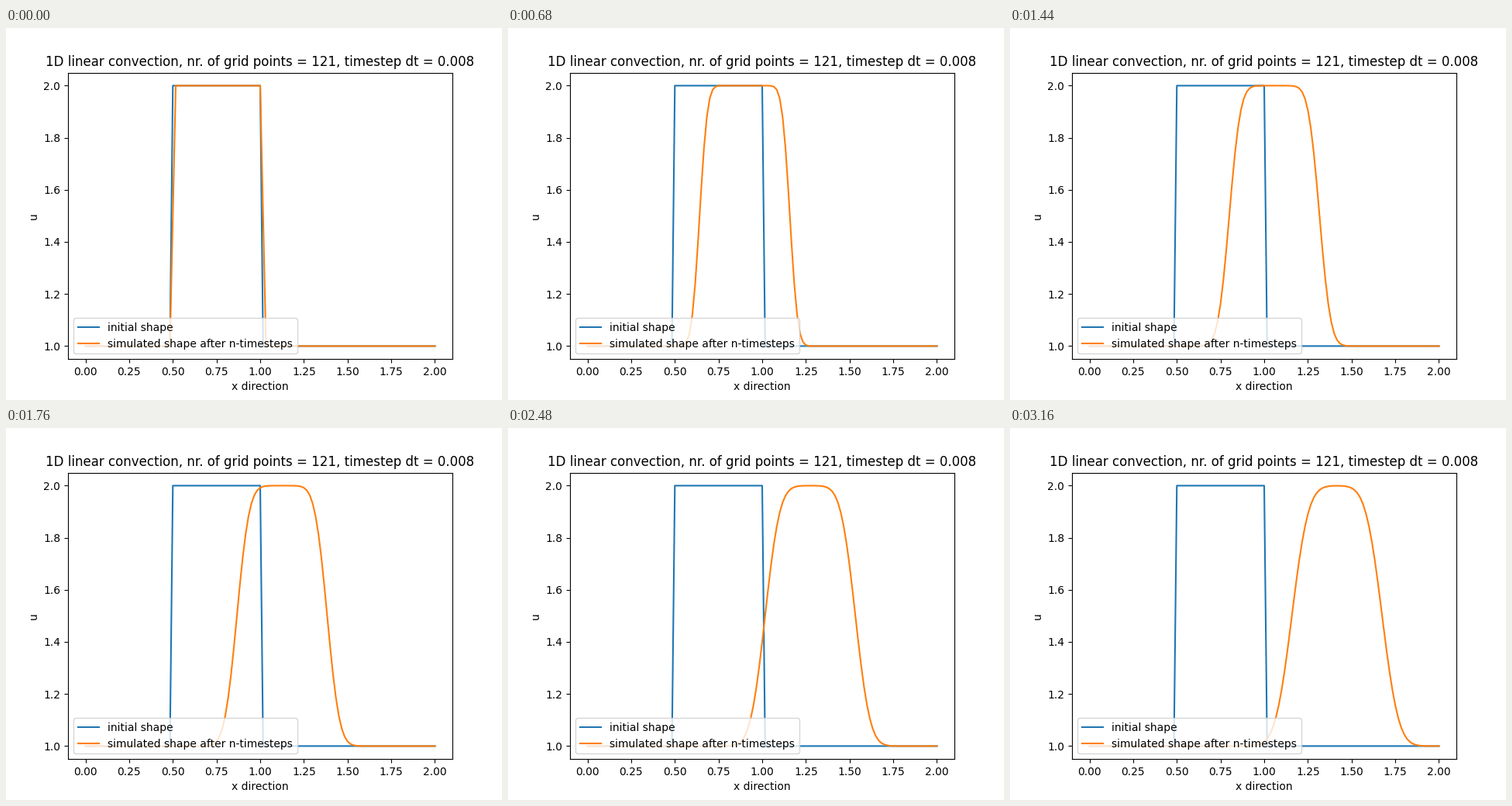
A matplotlib script for the animation above (3.2 s loop, 640x480 px).

```python
import numpy as np
import matplotlib.pyplot as plt
from matplotlib.animation import FuncAnimation

NX = 121
FRAMES = 80
INTERVAL = 40
SPEED = 1.0
DX = 2 / (NX - 1)
DT = 0.5 * DX

x = np.linspace(0, 2, NX)
start = np.ones(NX)
start[30:61] = 2


def upwind(u):
    """Advance the wave by one first-order upwind step."""
    nxt = u.copy()
    nxt[1:] -= SPEED * DT / DX * (u[1:] - u[:-1])
    return nxt


history = [upwind(start)]
while len(history) < FRAMES:
    history.append(upwind(history[-1]))

fig, ax = plt.subplots(figsize=(6.4, 4.8), dpi=100)
ax.plot(x, start, label="initial shape")
wave, = ax.plot(x, history[0], label="simulated shape after n-timesteps")
ax.set_xlabel("x direction")
ax.set_ylabel("u")
ax.set_title(f"1D linear convection, nr. of grid points = {NX}, "
             f"timestep dt = {DT:.3f}")
ax.legend(loc="lower left")


def update(i):
    wave.set_ydata(history[i])
    return wave,


anim = FuncAnimation(fig, update, frames=FRAMES, interval=INTERVAL,
                     repeat=True, repeat_delay=0)
plt.show()
```
